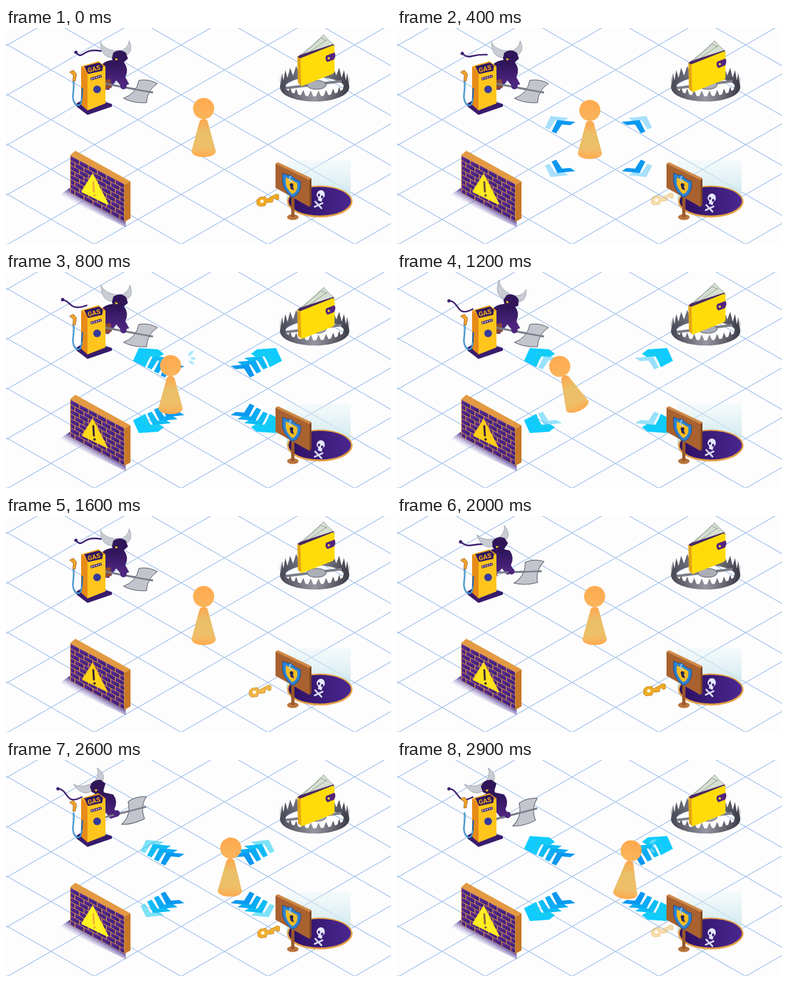
Animation, 600 px wide and 338 px high, one loop 3000 ms. Source, as an HTML page:

```html
<!DOCTYPE html>
<html lang="en">
<head>
<meta charset="utf-8">
<style>
html, body { margin: 0; width: 100%; height: 100%; overflow: hidden; background: #fdfdfe; }
svg { display: block; width: 600px; height: 338px; }
</style>
</head>
<body>
<svg viewBox="0 0 600 338">
  <defs>
    <linearGradient id="skin" x2="0" y2="1"><stop stop-color="#ffa64d"/><stop offset=".35" stop-color="#e9bf68"/><stop offset=".75" stop-color="#eebf69"/><stop offset="1" stop-color="#ffa94e"/></linearGradient>
    <linearGradient id="head" x2="0" y2="1"><stop stop-color="#ffa94e"/><stop offset="1" stop-color="#f9b55c"/></linearGradient>
    <linearGradient id="brick" x2="1" y2="1"><stop stop-color="#65309b"/><stop offset="1" stop-color="#2d1a70"/></linearGradient>
    <linearGradient id="shade" gradientUnits="userSpaceOnUse" x1="143" y1="277" x2="135" y2="291"><stop stop-color="#4d3590"/><stop offset="1" stop-color="#b9acd8" stop-opacity="0"/></linearGradient>
    <linearGradient id="steel"><stop stop-color="#4b4c58"/><stop offset=".5" stop-color="#94959f"/><stop offset="1" stop-color="#3d3e49"/></linearGradient>
    <linearGradient id="mist" x2="0" y2="1"><stop stop-color="#dff1f4" stop-opacity=".3"/><stop offset="1" stop-color="#c8e5eb"/></linearGradient>
    <linearGradient id="pit"><stop stop-color="#2c1062"/><stop offset="1" stop-color="#4a2790"/></linearGradient>
    <linearGradient id="hide" x2="0" y2="1"><stop stop-color="#2b1456"/><stop offset="1" stop-color="#582a8c"/></linearGradient>
  </defs>
  <path id="grid" fill="none" stroke="#86aee2"/>
  <g id="arrows"></g>

  <!-- bull -->
  <path id="tail" fill="none" stroke="#3d2070" stroke-width="2.4" stroke-linecap="round"/>
  <circle id="tailTip" r="2.6" fill="#3d2070"/>
  <g id="torso">
    <path fill="url(#hide)" d="M146 66Q148 52 166 50L184 54Q192 64 186 77L192 88 180 92 172 82 160 97 150 96Z"/>
    <path fill="#8a4a35" d="M150 82l13-2 2 13-14 5z"/>
  </g>
  <g id="axe">
    <path stroke="#777b88" stroke-width="3" d="M154 87L229 101"/>
    <path fill="#c3c5cd" stroke="#555a66" d="M207 82Q222 79 236 87Q220 97 219 117Q198 118 183 110Q203 103 207 82Z"/>
    <path stroke="#7b7f8b" stroke-width="2.5" d="M190 94l39 7"/>
    <circle cx="183" cy="91" r="5" fill="#4c267e"/>
  </g>
  <g id="bullHead">
    <path fill="#c9ccd3" stroke="#858a96" stroke-width=".6" d="M172 46Q148 50 147 22Q154 35 174 36ZM181 45Q201 40 192 20Q190 32 178 36Z"/>
    <path fill="#301659" d="M167 39Q177 31 187 39L190 48 182 55 179 62 171 57 165 48Z"/>
    <path fill="#ffd51f" d="M170 47l5 2-4 2z"/>
  </g>

  <!-- fuel pump -->
  <path fill="#371b6c" d="M110 118L127 108 165 119V123L127 136 110 123Z"/>
  <path fill="#e78b18" d="M117 60L127 67V129L117 120Z"/>
  <path fill="#ffc51d" d="M127 67L155 60V118L127 129Z"/>
  <path fill="#f9a91a" d="M117 60L144 52 155 60 127 67Z"/>
  <path fill="#2e195e" d="M122 60L145 54 151 59 150 67 128 72Z"/>
  <text transform="matrix(1 -.26 .2 1 128 70)" font-family="Roboto, sans-serif" font-size="10" font-weight="700" fill="#ffab20">GAS</text>
  <path stroke="#40246f" stroke-width="4" d="M132 80L149 75"/>
  <path stroke="#e8e4f4" stroke-width="1.6" stroke-dasharray="2 1.6" d="M133 79.700L148 75.300"/>
  <circle cx="142" cy="96" r="6" fill="#373a9b"/>
  <path fill="none" stroke="#256ab3" stroke-width="2.4" d="M105 82C108 96 100 109 108 119Q117 126 118 110L119 94"/>
  <path fill="none" stroke="#62c9ed" d="M105 82C108 96 100 109 108 119Q117 126 118 110"/>
  <path id="nozzle" fill="#f4a328" stroke="#80522c" stroke-width=".7" d="M99 69L105 66 110 72 108 83 104 83 105 74Z"/>

  <!-- trap and wallet -->
  <ellipse cx="481" cy="92" rx="50" ry="19" fill="none" stroke="url(#steel)" stroke-width="8"/>
  <path id="teeth" fill="url(#steel)" fill-rule="evenodd"/>
  <path stroke="#7b7d88" stroke-width="4" d="M436 94L523 83"/>
  <ellipse cx="484" cy="89" rx="15" ry="7" fill="#aaaeb7" stroke="#555964"/>
  <g id="wallet">
    <path fill="#d6dfd2" stroke="#74877a" stroke-width=".7" d="M459 42L485 21 495 10 502 18 511 26 470 44ZM464 40L490 15 500 20M468 41L500 18"/>
    <path fill="#4a2a62" d="M454 45L458 42 510 25 512 29 459 48Z"/>
    <path fill="#e3a613" d="M454 45L460 48V90L455 86Z"/>
    <path fill="#ffdc08" d="M459 47L509 27Q512 27 512 32V67Q512 70 508 72L460 91Z"/>
    <path fill="#52247d" d="M499 43L512 38Q515 44 511 49L501 53Q496 49 499 43Z"/>
    <circle cx="503" cy="47" r="1.8" fill="#ffd51f"/>
  </g>

  <!-- wall -->
  <path fill="url(#shade)" d="M82 262L100 250 186 298 187 312Z"/>
  <path fill="#e39a42" d="M100 199L108 192 194 240 185 245Z"/>
  <path fill="#c87927" d="M185 245L194 240V298L185 303Z"/>
  <g transform="matrix(1 .53 0 1 100 199)">
    <path fill="#d28b4c" d="M0 0H85V59H0Z"/>
    <g id="bricks" fill="url(#brick)"></g>
  </g>
  <path id="sign" stroke-linejoin="round" d="M135 230L119 256 158 275Z"/>
  <g id="mark"><path stroke-width="3" stroke-linecap="round" d="M136 241L137 256"/><circle cx="138" cy="262" r="1.4"/></g>

  <!-- pit -->
  <path fill="url(#mist)" d="M437 207H537V270H437Z"/>
  <ellipse cx="489" cy="271.500" rx="51" ry="25" fill="#e4a044"/>
  <ellipse cx="489" cy="271" rx="48.500" ry="22.500" fill="url(#pit)"/>
  <g id="skull">
    <path stroke="#dadcf0" stroke-width="3" stroke-linecap="round" d="M482 273L495 282M495 273L483 282"/>
    <path fill="#e6e9ff" d="M482 262C480 249 496 247 496 261L493 266V271L486 270V266Z"/>
    <path fill="#40237b" d="M484 260a2 2.500 0 1 0 4 1a2 2.500 0 1 0-4-1M490 262a1.800 2.400 0 1 0 4 1a2 2.500 0 1 0-4-1"/>
  </g>

  <g id="key">
    <path fill="#efab22" stroke="#bd7916" stroke-width=".8" d="M-17 0L-13-4-4-5-2-1 13-9 17-8V-1L13 0 12-3 8-1V3L4 4-2 4-4 9-13 10-17 7Z"/>
    <circle cx="-9" cy="2" r="2.600" fill="#fff"/>
  </g>

  <!-- board -->
  <ellipse cx="447" cy="296" rx="9" ry="4.500" fill="#b8743c"/>
  <path stroke="#9b592b" stroke-width="5" d="M447 262V296"/>
  <path fill="#d08a45" d="M420 212L424 210 476 235 473 239Z"/>
  <path fill="#a9622f" d="M420 212L473 238V280L420 250Z"/>
  <path fill="#824620" d="M473 238L476 235V277L473 280Z"/>
  <path fill="#2d83d4" stroke="#164a93" d="M431 227Q440 232 444 230Q450 238 459 240V249Q456 263 446 265Q433 255 431 241Z"/>
  <path fill="#f6bd23" d="M436 234L444 237 454 243V250Q452 258 446 260Q438 253 436 244Z"/>
  <path fill="#282358" d="M442 245a3 3 0 1 1 5 3l2 6-5-2z"/>
  <path fill="none" stroke="#9ed9fb" stroke-width="1.500" d="M444 231l-3 7 5 3"/>

  <g id="pawn">
    <path fill="url(#skin)" d="M302 145Q308 139 314 145L327 193C326 205 290 205 289 193Z"/>
    <circle cx="308" cy="126" r="16.500" fill="url(#head)"/>
    <path id="sweat" fill="#aeeafd" d="M335 111q-1-7 10-9q-3 9-10 9M338 114q5-4 10 1q-5 4-10-1M336 118q8 0 9 6q-8 1-9-6"/>
  </g>
</svg>
<script>
const $ = id => document.getElementById(id);
const set = (id, name, value) => $(id).setAttribute(name, value);
const move = (id, x, y, angle = 0, pivot = '0 0') =>
  set(id, 'transform', `translate(${x} ${y}) rotate(${angle} ${pivot})`);

// Smooth 0 to 1 step, and a pulse made of two steps.
function ease(t, start, span) {
  const k = Math.max(0, Math.min(1, (t - start) / span));
  return k * k * (3 - 2 * k);
}
const pulse = (t, rise, riseSpan, fall, fallSpan) => ease(t, rise, riseSpan) - ease(t, fall, fallSpan);

const SPACING = 78, SLOPE = .577;
let lines = '';
for (let y = -4 * SPACING; y < 750; y += SPACING) {
  lines += `M0 ${y + 25}l600 ${600 * SLOPE}M0 ${y + 28}l600 ${-600 * SLOPE}`;
}
set('grid', 'd', lines);

let teeth = '';
for (let i = 0; i < 56; i++) {
  const a = i * Math.PI / 28;
  teeth += `${i ? 'L' : 'M'}${481 + 54 * Math.cos(a)} ${91 + 21 * Math.sin(a) - (i % 2 ? 14 : 0)}`;
}
set('teeth', 'd', teeth + 'ZM429 91a52 20 0 0 0 104 0a52 20 0 0 0-104 0Z');

let bricks = '';
for (let row = 0; row < 8; row++) {
  for (let x = row % 2 ? -7 : 0; x < 84; x += 14) {
    const left = Math.max(1, x + 1), right = Math.min(84, x + 13.6);
    bricks += `<path d="M${left} ${row * 7.3 + 1}H${right}v6.200H${left}z"/>`;
  }
}
$('bricks').innerHTML = bricks;

// One arrow, four stripes and a tip, mirrored into the four corners.
let arrow = '<path class="step4" fill="#0fcbff" d="M198 139L207 119 237 121 246 128 225 130 217 149Z"/>';
for (let i = 0; i < 4; i++) {
  arrow += `<path class="step${i}" fill="hsl(${203 - 4 * i} 92% ${49 + i}%)" transform="translate(${-10.5 * i} ${-6.3 * i})"
    d="M278 147L250 144 241 162 248 165 257 151 270 152Z"/>`;
}
for (const sx of [1, -1]) for (const sy of [1, -1]) {
  $('arrows').innerHTML += `<g transform="translate(${314 - 314 * sx} ${185.5 - 185.5 * sy}) scale(${sx} ${sy})">${arrow}</g>`;
}
const steps = [0, 1, 2, 3, 4].map(i => document.querySelectorAll('.step' + i));

function draw(t) {
  const cycle = t % 2000;
  steps.forEach((parts, i) => {
    const alpha = pulse(cycle, 250 + 90 * i, 150, 910 + 90 * i, 200);
    parts.forEach(p => p.setAttribute('opacity', alpha));
  });

  const dodge = pulse(t, 250, 650, 1180, 320), lunge = ease(t, 2200, 600);
  const tilt = 8 * ease(t, 2500, 400) - 24 * pulse(t, 850, 350, 1200, 300);
  move('pawn', 57 * lunge - 55 * dodge, 16 * lunge + 22 * dodge, tilt, '308 126');
  set('sweat', 'opacity', pulse(cycle, 600, 150, 820, 160));

  const sneak = ease(t, 1800, 400);
  move('bullHead', -33 * sneak, -4 * sneak, 22 * pulse(t, 700, 500, 1200, 400) - 32 * sneak, '177 48');
  move('torso', -17 * sneak, 0);
  move('axe', -10 * sneak, 2 * sneak + 4 * ease(t, 2400, 500), -25 * sneak, '158 87');
  move('nozzle', 0, -8 * ease(t, 2400, 500));

  const sway = pulse(t, 0, 1200, 1200, 400) + ease(t, 1800, 500);
  const tipX = 109 - 28 * sway, tipY = 38 + 7 * sway;
  set('tail', 'd', `M${148 - 30 * sway} ${36 + 22 * sway}C${118 - 26 * sway} ${30 + 42 * sway}
    ${120 - 22 * sway} ${52 - 6 * sway} ${tipX} ${tipY}`);
  set('tailTip', 'cx', tipX);
  set('tailTip', 'cy', tipY);

  const wave = delay => Math.cos((cycle - delay) * Math.PI / 1000);
  move('wallet', 0, 6 + 8 * wave(750));
  set('skull', 'transform', `translate(0 ${5 + 5 * wave(850)}) rotate(12 489 268) translate(489 268) scale(.9) translate(-489 -268)`);

  const glow = (1 + Math.cos(t * Math.PI / 1300)) / 2, pale = glow ** 5;
  set('sign', 'fill', `rgb(255 ${205 + 40 * glow} ${25 + 10 * glow})`);
  set('sign', 'stroke', `rgb(255 ${185 + 55 * glow} 35)`);
  set('sign', 'stroke-width', 1 + 2 * glow);
  const ink = `rgb(${55 + 190 * pale} ${30 + 145 * pale} 60)`;
  set('mark', 'stroke', ink);
  set('mark', 'fill', ink);

  const slide = (t + 1200) % 2500;
  move('key', 392 + slide * .0133, 275 - slide * .005);
  set('key', 'opacity', pulse(slide, 0, 400, 1200, 700));
}

function tick() {
  draw(Math.floor(performance.now() / 100) * 100 % 3000);
  requestAnimationFrame(tick);
}
tick();
</script>
</body>
</html>
```
